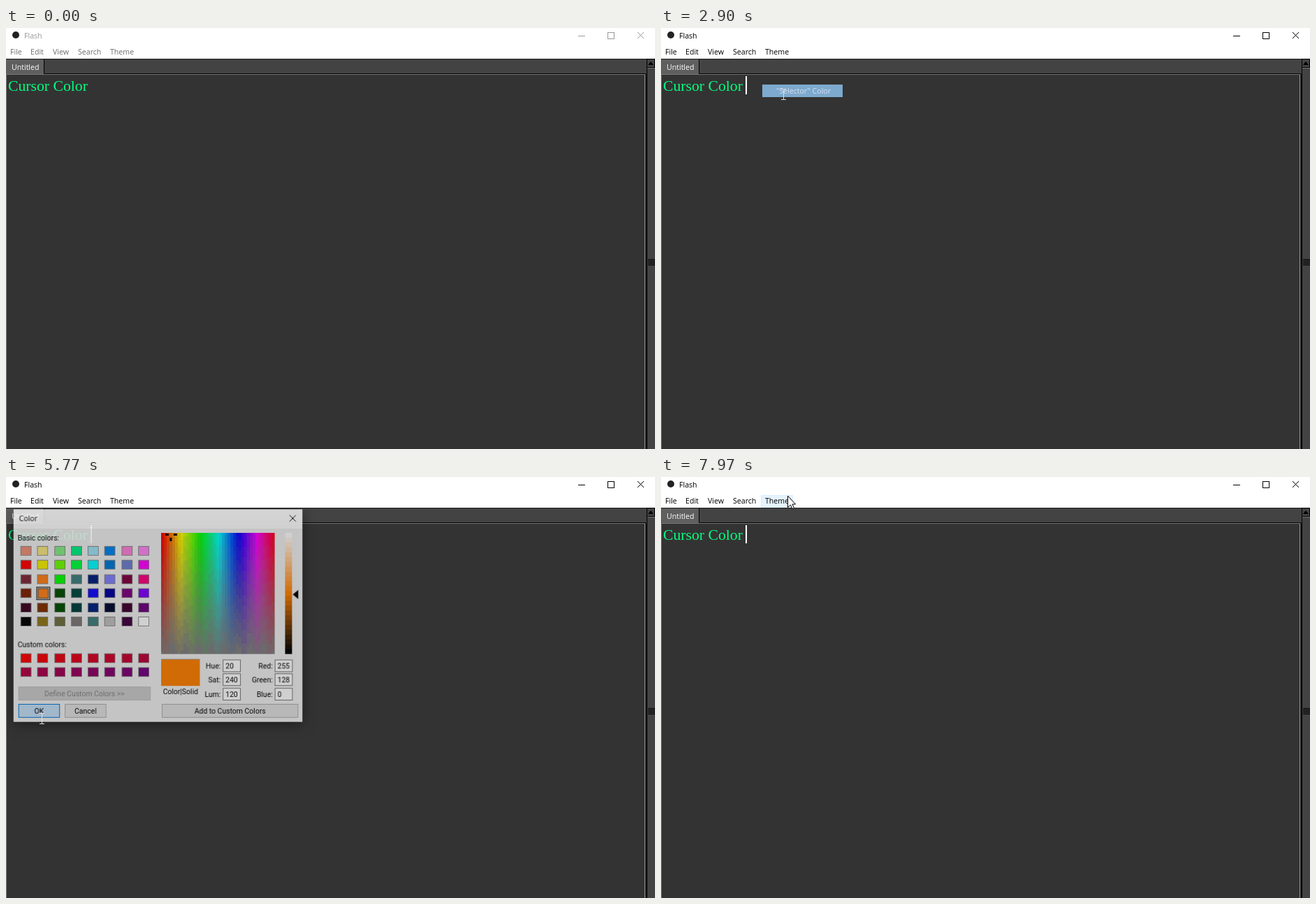
These frames come from a looping animation (929x603 px, 7.99 s). An HTML page with a canvas:

```html
<!DOCTYPE html>
<html lang="en">
<head>
<meta charset="utf-8">
<title>Editor</title>
<style>
html, body { margin: 0; width: 100%; height: 100%; overflow: hidden; background: #333; }
canvas { display: block; }
</style>
</head>
<body>
<canvas id="stage" width="929" height="603"></canvas>
<script>
const LOOP = 7990;
const UI = '10.6px "Open Sans", sans-serif';
const SMALL = '10.5px Roboto, sans-serif';
const SERIF = '21.7px "Liberation Serif", serif';
const LINE = 'Cursor Color ';

const stage = document.getElementById('stage').getContext('2d');
const layer = document.createElement('canvas');
layer.width = 929;
layer.height = 603;
const dialogCtx = layer.getContext('2d');
let g = stage;

// pointer: time, x, y
const path = [
  [220, 866, 600], [1000, 218, 107], [1030, 218, 107], [1300, 152, 60], [1500, 160, 35],
  [2010, 160, 35], [2410, 175, 87], [2560, 175, 87], [2700, 175, 95], [3090, 175, 95],
  [3340, 155, 133], [3580, 129, 168], [3810, 166, 202], [3990, 166, 202], [4340, 41, 174],
  [4540, 41, 174], [4640, 42, 169], [4720, 50, 167], [4880, 50, 167], [5220, 46, 298],
  [5370, 46, 298], [5560, 51, 342], [5770, 51, 346], [6030, 122, 90], [6360, 122, 90],
  [6630, 13, 90], [6840, 13, 90], [7100, 132, 92], [7340, 132, 92], [7720, 177, 14], [7970, 181, 27]
];
const presses = [[1660, 1780], [2760, 2850], [4720, 4860], [5600, 5730], [6360, 6860], [7100, 7340]];
const carets = [[1660, 2260], [2560, 2960], [5760, 6360], [7040, 7640], [7940, LOOP]];

const OPEN = 2960, CLOSE = 5740, PICK = 4760, MENU_ON = 1700, MENU_OFF = 2850;
const basic = `f09078 f8e880 84ec84 00f084 a0e4f8 0084f0 ff80d8 ff88f4
  ff0000 f8f000 70ff00 00ff40 00ffff 0078d7 7080d0 ff00ff
  802838 ff8018 00ff00 408080 002080 8080ff 800040 ff0080
  802000 ff8018 005000 004840 1008ff 0000a0 800080 8000ff
  400020 803000 005000 004040 002080 000830 400030 700080
  000000 907818 707040 807878 408080 c0c0c0 400040 ffffff`.split(/\s+/);
const items = [['Text Color', 168], ['Cursor Color', 168], ['"Selector" Color', 165], ['Themes', 171]];

const within = (t, spans) => spans.some(([a, b]) => t >= a && t < b);
const clamp = v => Math.max(0, Math.min(1, v));

function rect(x, y, w, h, fill, edge, width = 1) {
  g.fillStyle = fill;
  g.fillRect(x, y, w, h);
  if (edge) {
    g.strokeStyle = edge;
    g.lineWidth = width;
    g.strokeRect(x + width / 2, y + width / 2, w - width, h - width);
  }
}

function text(s, x, y, color = '#000', font = UI, align = 'left') {
  g.font = font;
  g.fillStyle = color;
  g.textAlign = align;
  g.fillText(s, x, y);
}

function poly(points, fill) {
  g.beginPath();
  points.forEach(([x, y]) => g.lineTo(x, y));
  g.closePath();
  g.fillStyle = fill;
  g.fill();
}

function cross(x, y, size, color) {
  g.strokeStyle = color;
  g.lineWidth = 1;
  g.beginPath();
  g.moveTo(x, y);
  g.lineTo(x + size, y + size);
  g.moveTo(x + size, y);
  g.lineTo(x, y + size);
  g.stroke();
}

function pointerAt(t) {
  if (t < path[0][0]) return null;
  let i = path.findIndex(p => p[0] > t);
  if (i < 0) i = path.length - 1;
  const [t0, x0, y0] = path[i - 1], [t1, x1, y1] = path[i];
  const p = clamp((t - t0) / (t1 - t0)), e = p * p * (3 - 2 * p);
  return [x0 + (x1 - x0) * e, y0 + (y1 - y0) * e];
}

function drawFrame(active, themeFill, themeEdge) {
  rect(0, 0, 929, 603, '#333');
  rect(0, 0, 929, 44, '#fff');
  const ink = active ? '#000' : '#999';
  g.fillStyle = '#222';
  g.beginPath();
  g.arc(14, 10, 5, 0, 7);
  g.fill();
  text('Flash', 26, 15, ink);
  rect(819, 11, 10, 1, ink);
  g.strokeStyle = ink;
  g.lineWidth = 1;
  g.strokeRect(861.5, 6.5, 9, 9);
  cross(904, 6, 9, ink);
  if (themeFill) rect(143, 26, 46, 18, themeFill, themeEdge);
  const menus = { File: 6, Edit: 35, View: 67, Search: 103, Theme: 149 };
  for (const name in menus) text(name, menus[name], 38, active ? '#000' : '#6d6d6d');

  rect(0, 44, 917, 22, '#434343');
  rect(0, 44, 929, 1, '#1c1c1c');
  rect(0, 45, 54, 21, '#5f5f5f');
  rect(54, 45, 1, 21, '#000');
  text('Untitled', 8, 60, '#fff');
  rect(54, 65, 862, 1, '#000');
  rect(0, 66, 915, 1, '#777');
  rect(0, 66, 1, 537, '#777');
  rect(914, 67, 1, 536, '#999');
  rect(915, 66, 2, 537, '#1a1a1a');

  rect(917, 44, 12, 559, '#434343');
  rect(917, 44, 1, 559, '#000');
  rect(917, 44, 12, 13, '#434343', '#000');
  poly([[919, 53], [923, 48], [927, 53]], '#000');
  rect(918, 57, 11, 1, '#777');
  for (let y = 331; y < 341; y += 2) rect(919, y, 10, 1, '#000');
}

function drawText(t, x) {
  text(LINE, 3, 90, '#00ff7f', SERIF);
  if (t >= 6360 && t < 7100) {
    const stops = [...LINE].map((c, i) => 3 + g.measureText(LINE.slice(0, i)).width).slice(0, 12).concat(122);
    const reach = t < 6840 ? x : 13;
    const from = stops.reduce((a, b) => Math.abs(b - reach) < Math.abs(a - reach) ? b : a);
    g.save();
    g.beginPath();
    g.rect(Math.round(from), 69, 122 - Math.round(from), 26);
    g.clip();
    rect(0, 69, 122, 26, '#ff8000');
    text(LINE, 3, 90, '#fff', SERIF);
    g.restore();
  }
  if (within(t, carets)) rect(121, 69, 2, 26, '#fff');
}

function drawMenu(y) {
  g.save();
  g.shadowColor = 'rgba(0,0,0,.5)';
  g.shadowBlur = 4;
  g.shadowOffsetX = g.shadowOffsetY = 2;
  rect(143, 43, 119, 76, '#f2f2f2');
  g.restore();
  rect(143, 43, 119, 76, '#f2f2f2', '#b4b4b4');
  items.forEach(([name, x], i) => {
    const top = 46 + i * 17.7;
    if (y >= top && y < top + 17.7) rect(145, Math.round(top), 115, 18, '#91c9f7');
    text(name, x, Math.round(59 + i * 17.7));
  });
  poly([[249, 104], [253, 107.5], [249, 111]], '#000');
}

function swatch(x, y, color) {
  rect(x - 8, y - 7, 17, 15, '#fff');
  rect(x - 8, y - 7, 16, 14, '#888');
  rect(x - 7, y - 6, 14, 12, color);
}

function button(label, x, y, w, { fill = '#e1e1e1', edge = '#adadad', width = 1, ink = '#000' } = {}) {
  rect(x, y, w, 20, fill, edge, width);
  text(label, x + w / 2, y + 14, ink, SMALL, 'center');
}

function drawSpectrum(picked) {
  for (let x = 0; x < 164; x += 4) {
    for (let y = 0; y < 175; y += 5) {
      const sat = clamp(Math.round((1 - y / 175 + .05 * Math.sin(x * 12.9)) * 10) / 10);
      rect(222 + x, 79 + y, 4, 5, `hsl(${x / 164 * 360},${sat * 100}%,50%)`);
    }
  }
  const cx = picked ? 236 : 332, cy = picked ? 80 : 253;
  g.save();
  g.beginPath();
  g.rect(222, 79, 164, 175);
  g.clip();
  rect(cx - 1.5, picked ? 86 : 245, 3, 5, '#000');
  rect(cx - 8, cy, 5, 3, '#000');
  rect(cx + 4, cy, 5, 3, '#000');
  g.restore();

  for (let i = 0; i < 25; i++) {
    rect(401, 79 + i * 7, 10, 7, `hsl(30,${picked ? 100 : 0}%,${100 - i / 24 * 100}%)`);
  }
  const ay = picked ? 168 : 81;
  poly([[412, ay], [420, ay - 6.5], [420, ay + 6.5]], '#000');
}

function drawDialog(picked, hoverOk) {
  g.clearRect(0, 0, 929, 603);
  rect(9, 45, 417, 307, '#f0f0f0');
  rect(9, 45, 417, 28, '#fff');
  text('Color', 17, 62);
  cross(407.5, 53.5, 9, '#000');
  text('Basic colors:', 15, 90, '#000', SMALL);
  text('Custom colors:', 15, 244, '#000', SMALL);
  const colX = i => Math.round(27 + (i % 8) * 24.25);
  const rowY = (i, top) => Math.round(top + Math.floor(i / 8) * 20.45);
  basic.forEach((c, i) => {
    const x = colX(i), y = rowY(i, 105);
    swatch(x, y, '#' + c);
    if (i === (picked ? 25 : 47)) {
      rect(x - 9, y - 9, 20, 19, '#f0f0f0', '#000');
      rect(x - 7, y - 7, 16, 15, '#' + c, '#444');
      if (!picked) {
        g.setLineDash([1, 1]);
        g.strokeStyle = '#000';
        g.strokeRect(x - 10.5, y - 9.5, 22, 20);
        g.setLineDash([]);
      }
    }
  });
  for (let i = 0; i < 16; i++) swatch(colX(i), rowY(i, 260), `rgb(${255 - 9.3 * i},0,${8.3 * i})`);

  drawSpectrum(picked);
  rect(222, 261, 56, 39, '#a0a0a0');
  rect(223, 262, 55, 38, picked ? '#ff8000' : '#fff');
  text('Color|Solid', 250, 312, '#000', SMALL, 'center');
  const fields = [['Hue:', 160, 20], ['Sat:', 0, 240], ['Lum:', 240, 120],
                  ['Red:', 255, 255], ['Green:', 255, 128], ['Blue:', 255, 0]];
  fields.forEach(([name, before, after], i) => {
    const x = i < 3 ? 311 : 386, y = 262 + (i % 3) * 20.7 | 0;
    text(name, x - 3, y + 13, '#000', SMALL, 'right');
    rect(x, y, 26, 18, '#fff', '#7a7a7a');
    text(picked ? after : before, x + 4, y + 13, '#000', SMALL);
  });

  button('Define Custom Colors >>', 16, 301, 191, { fill: '#ccc', edge: '#bfbfbf', ink: '#838383' });
  button('OK', 16, 326, 60, { fill: hoverOk ? '#c4e0f8' : '#e1e1e1', edge: '#0078d7', width: hoverOk ? 1 : 2 });
  button('Cancel', 83, 326, 60);
  button('Add to Custom Colors', 223, 326, 197);
}

function showDialog(t) {
  const opening = 1 - (1 - clamp((t - OPEN) / 200)) ** 3;
  const closing = clamp((t - CLOSE) / 150);
  const alpha = opening * (1 - closing);
  if (!alpha) return;
  const scale = .95 + .05 * opening - .04 * closing;
  g = dialogCtx;
  drawDialog(t >= PICK, t >= 5480);
  g = stage;
  g.save();
  g.beginPath();
  g.rect(0, 44, 929, 559);
  g.clip();
  g.translate(217.5, 198.5);
  g.scale(scale, scale);
  g.globalAlpha = alpha;
  g.shadowColor = 'rgba(0,0,0,.55)';
  g.shadowBlur = 18;
  g.shadowOffsetY = 3;
  g.drawImage(layer, -217.5, -198.5);
  g.restore();
}

function fadeItem(t) {
  g.save();
  g.globalAlpha = (1 - clamp((t - MENU_OFF) / 270)) ** 1.1;
  rect(145, 81, 115, 18, '#91c9f7');
  text(items[2][0], 165, 94, '#eef');
  g.restore();
}

function drawPointer(x, y, arrow) {
  g.save();
  g.translate(Math.round(x), Math.round(y));
  g.lineWidth = 1;
  if (arrow) {
    poly([[.5, 0], [.5, 16.5], [4.5, 13], [7, 18.5], [9.5, 17.5], [7, 12], [11.5, 12]], '#fff');
    g.strokeStyle = '#000';
    g.stroke();
  } else {
    rect(0, -7, 1, 15, '#ddd');
    for (const side of [-8, 7]) {
      rect(-3, side, 3, 1, '#ddd');
      rect(1, side, 3, 1, '#ddd');
    }
  }
  g.restore();
}

function draw(t) {
  const dialogUp = t >= OPEN && t < CLOSE;
  const menuUp = t >= MENU_ON && t < MENU_OFF;
  const pos = pointerAt(t);
  const [x, y] = pos || [-99, -99];
  const hover = t > 7340 && x >= 143 && x < 189 && y >= 26 && y < 44;
  drawFrame(t >= 1660 && !dialogUp, menuUp ? '#cce8ff' : hover && '#e5f3ff', menuUp ? '#99d1ff' : '#d8ecfc');
  drawText(t, x);
  if (menuUp) drawMenu(y);
  if (t >= OPEN) showDialog(t);
  if (t >= MENU_OFF && t < MENU_OFF + 270) fadeItem(t);
  if (!pos) return;
  if (within(t, presses)) {
    g.fillStyle = 'rgba(255,220,0,.6)';
    g.beginPath();
    g.arc(x, y, 11.5, 0, 7);
    g.fill();
  }
  drawPointer(x, y, menuUp || dialogUp || y < 66 || x > 915);
}

function tick(now) {
  draw(now % LOOP);
  requestAnimationFrame(tick);
}
requestAnimationFrame(tick);
</script>
</body>
</html>
```
